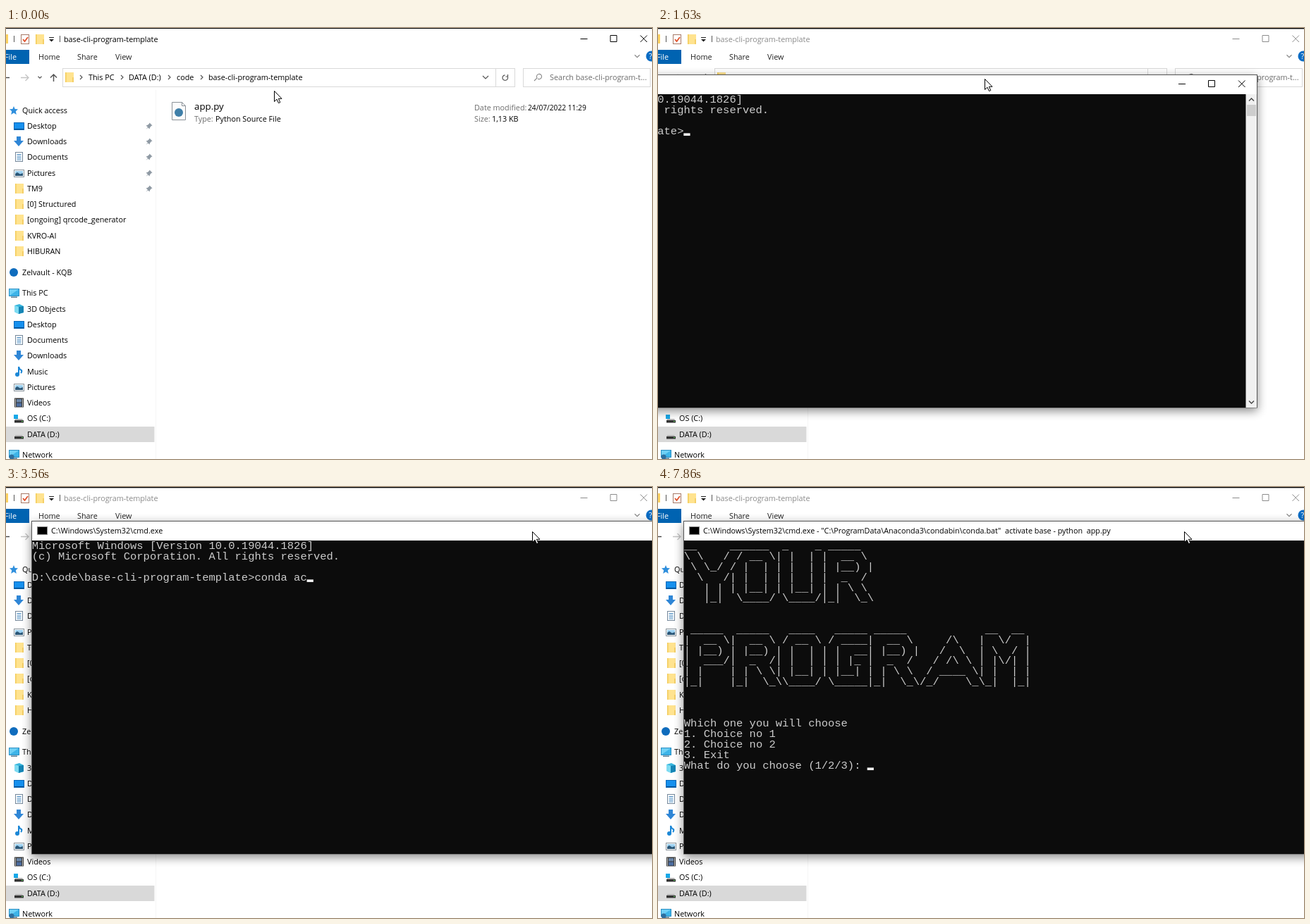
An HTML page that plays this animation: 916 px wide and 612 px high, repeating every 8 s.

```html
<!DOCTYPE html>
<html lang="en">
<head>
<meta charset="utf-8">
<title>Command line program</title>
<style>
html, body { margin: 0; width: 100%; height: 100%; overflow: hidden; background: #fff; }
svg { display: block; }
text { white-space: pre; font: 10.8px "Open Sans", "Noto Sans", sans-serif; }
#rows text { font: 15.47px "Liberation Mono", "DejaVu Sans Mono", monospace; fill: #ccc; }
</style>
</head>
<body>
<svg id="stage" width="916" height="612" viewBox="0 0 916 612"></svg>
<script>
const LOOP = 8000;
const CELL = 9.28, ROW = 14.84, LEFT = 36.8, TOP = 76;
const raw = String.raw;

// Drawing helpers
const text = (x, y, s, fill = '#000', size = 10.8, id = '') =>
  `<text ${id && `id="${id}"`} x="${x}" y="${y}" fill="${fill}" style="font-size:${size}px">${s}</text>`;
const rect = (x, y, w, h, fill, more = '') =>
  `<rect x="${x}" y="${y}" width="${w}" height="${h}" fill="${fill}" ${more}/>`;
const path = (d, fill, stroke = 'none', width = 1) =>
  `<path d="${d}" fill="${fill}" stroke="${stroke}" stroke-width="${width}"/>`;
const line = (d, stroke = '#555', width = 1) => path(d, 'none', stroke, width);
const dot = (x, y, r, fill) => `<circle cx="${x}" cy="${y}" r="${r}" fill="${fill}"/>`;
const at = (x, y, body) => `<g transform="translate(${x} ${y})">${body}</g>`;
const group = (id, body) => `<g id="${id}">${body}</g>`;

const screenIcon = rect(-7, -6, 15, 11, '#2a8fc4') + rect(-6, -5, 13, 9, '#6fd0f5') +
  path('M-6 4L7-5V4z', '#3db4e8') + rect(-4, 5.5, 9, 1.5, '#5b7f95');
const driveIcon = path('M-5 1H5L7 4H-6z', '#b5b5b5') + rect(-6, 3, 13, 3.5, '#333') + rect(4, 4, 2, 1, '#5fd35f');
const icons = {
  folder: rect(-5, -7, 12, 14, '#ffe38f') + rect(-5, -7, 1.5, 14, '#f3cb59') + rect(5, 0, 2, 7, '#f5cf68'),
  star: path('M0-6L1.7-2 6-1.7 2.8 1.2 3.8 6 0 3.4-3.8 6-2.8 1.2-6-1.7-1.7-2z', '#2f8fdd'),
  desktop: rect(-7, -5, 15, 11, '#0567b8') + rect(-6, -4, 13, 8, '#1590ee') + rect(-6, 4, 13, 1, '#0a4f8c'),
  downloads: path('M-3-7H3V-1H7L0 7-7-1H-3z', '#2f86d6'),
  documents: rect(-4.5, -6.5, 10, 13, '#fff', 'stroke="#74879a"') +
    line('M-2.5-3.5H3.5M-2.5-1H3.5M-2.5 1.5H3.5M-2.5 4H3.5', '#3b82bd'),
  pictures: rect(-6.5, -4.5, 14, 10, '#fff', 'stroke="#8a949c"') + rect(-5, -3, 11, 7, '#9cd0f0') +
    path('M-5 4V1L-2-1 2 1.5 6 0V4z', '#2c5878'),
  round: dot(0, 0, 6, '#0f6cbd'),
  screen: screenIcon,
  cube: path('M-6-5L1-7 7-4V5L0 7-6 4z', '#38b6dd') + path('M-6-5L0-3V7L-6 4z', '#7fdcf2') + path('M0-3L7-4V5L0 7z', '#1685b5'),
  music: dot(-2, 4, 3, '#1c87d6') + line('M0 4V-7Q1-3 4-2Q5 0 3 2', '#1c87d6', 2),
  videos: rect(-6, -6.5, 13, 13, '#333') + rect(-3, -5, 7, 4.5, '#6a86a8') + rect(-3, .5, 7, 5, '#4b6ca0') +
    line('M-4.5-5.5V6M5.5-5.5V6', '#ccc'),
  system: rect(-7, -5, 6, 6, '#18a8e8') + driveIcon,
  drive: driveIcon,
  network: at(0, -1, screenIcon) + dot(-3, 3, 3.5, '#2e6f9f')
};
const icon = (name, x, y) => at(x, y, icons[name]);

const sidebar = [
  ['star', 'Quick access', 117, 0], ['desktop', 'Desktop', 139], ['downloads', 'Downloads', 161],
  ['documents', 'Documents', 183], ['pictures', 'Pictures', 206], ['folder', 'TM9', 228],
  ['folder', '[0] Structured', 250], ['folder', '[ongoing] qrcode_generator', 272],
  ['folder', 'KVRO-AI', 295], ['folder', 'HIBURAN', 317],
  ['round', 'Zelvault - KQB', 347, 0], ['screen', 'This PC', 376, 0],
  ['cube', '3D Objects', 399], ['desktop', 'Desktop', 421], ['documents', 'Documents', 443],
  ['downloads', 'Downloads', 465], ['music', 'Music', 488], ['pictures', 'Pictures', 510],
  ['videos', 'Videos', 532], ['system', 'OS (C:)', 554], ['drive', 'DATA (D:)', 577],
  ['network', 'Network', 606, 0]
];
const pin = y => at(203, y, path('M.5-4.5L4.5-.5 3 0 1 2.5 .5 4.5-1.5 2.5-4.5 4.8-2 1.7-4.5-.5-2.5-1 0-3z', '#8f9aa4'));
const chevron = (x, y = 70) => line(`M${x - 1} ${y - 3}l3 3-3 3`, '#555', 1.2);
const down = (x, y, r, color = '#555') => line(`M${x - r} ${y - r / 2}l${r} ${r} ${r}-${r}`, color, 1.2);

function windowButtons(x, y) {
  return line(`M${x - 5} ${y + .5}h10M${x + 37.5} ${y - 4.5}h9v9h-9zM${x + 80} ${y - 4.5}l9.5 9.5m0-9.5l-9.5 9.5`, 'currentColor');
}

function explorer() {
  const head = rect(0, 0, 916, 1, '#000') + rect(0, 1, 916, 1, '#aaa', 'id="edge"') +
    rect(0, 9, 3, 13, '#fbd160') + line('M11.5 11V20M76.5 11V20', '#555') +
    rect(21.5, 9.5, 11, 13, '#fff', 'stroke="#a77a68"') + line('M24 16l2.5 3 4.5-6', '#e0522d', 1.8) +
    icon('folder', 47, 16) + line('M61 13.5h7', '#222') + path('M61 16h7l-3.5 3.5z', '#222') +
    text(82, 20, 'base-cli-program-template', 'currentColor') + windowButtons(819.5, 15);
  const ribbon = rect(0, 31, 33, 20, '#0063b1') + text(-2, 45, 'File', '#fff') +
    [[46, 'Home'], [101, 'Share'], [155, 'View']].map(([x, s]) => text(x, 45, s, '#222')).join('') +
    down(895, 40, 3.5, '#888') + dot(915, 40, 7.5, '#0a6cc4') + text(911.5, 44, '?', '#fff');
  const nav = line('M0 70.5h5', '#444', 1.4) + line('M21 70.5h11m-4.5-4.5l4.5 4.5-4.5 4.5', '#c4c4c4', 1.3) +
    down(48, 70, 2.5) + line('M67.5 76V66m-4.5 4.5l4.5-4.5 4.5 4.5', '#555', 1.5) +
    rect(80.5, 57.5, 641, 26, '#fff', 'stroke="#d9d9d9"') + line('M694.5 58V83', '#d9d9d9') +
    icon('folder', 89, 70) + down(680, 70, 4) +
    line('M711 68.5a3.8 3.8 0 1 1-3.5-1.7M711.5 66v3h-3', '#555', 1.2) +
    rect(733.5, 57.5, 180, 26, '#fff', 'stroke="#d9d9d9"') +
    line('M749 75l4-4a3.6 3.6 0 1 1 1 1', '#888', 1.1) +
    text(771, 74, 'Search base-cli-program-t...', '#6d6d6d');
  const crumbs = [106, 164, 231, 277].map(x => chevron(x)).join('') +
    [[117, 'This PC'], [174, 'DATA (D:)'], [242, 'code'], [287, 'base-cli-program-template']]
      .map(([x, s]) => text(x, 74, s)).join('');
  const edit = rect(103, 64, 177, 15, '#0078d7', 'id="mark"') + text(103, 74, '', '#000', 10.8, 'entry') +
    rect(280, 64, 1, 14, '#000', 'id="caret"');
  const side = line('M212.5 88V612', '#f5f5f5') + rect(0, 566, 210.5, 22, '#d9d9d9') +
    sidebar.map(([name, label, y, top]) =>
      icon(name, top === 0 ? 11 : 18, y) + text(top === 0 ? 23 : 30, y + 4, label)).join('') +
    [139, 161, 183, 206, 228].map(pin).join('');
  const files = path('M235.5 105.5h14l5 5v20h-19z', '#fcfcfc', '#8b9298') + line('M249.5 105.5v5h5', '#8b9298') +
    dot(245, 120, 6, '#3f7fa8') + text(267, 116, 'app.py', '#000', 13.3) +
    text(267, 133, 'Type:', '#6d6d6d') + text(297, 133, 'Python Source File') +
    text(664, 117, 'Date modified:', '#6d6d6d') + text(740, 117, '24/07/2022 11:29', '#000', 10.2) +
    text(664, 133, 'Size:', '#6d6d6d') + text(689, 133, '1,13 KB');
  const list = rect(103.5, 84.5, 609, 48, '#fff', 'stroke="#bbb"') +
    text(108, 102, '', '#000', 10.8, 'hint') + text(108, 125, 'cmd');
  return group('head', head) + ribbon + nav + group('crumbs', crumbs) + group('edit', edit) +
    side + files + group('list', list);
}

function terminal() {
  const rows = Array.from({ length: 22 }, (_, i) =>
    `<text x="${LEFT}" y="${TOP + i * ROW + 12.2}" xml:space="preserve"></text>`).join('');
  return rect(36, 52, 1130, 474, '#000', 'opacity=".45" style="filter:blur(7px)"') +
    rect(36, 48, 1130, 473.5, '#555') + rect(37, 49, 1128, 27, '#fff') + rect(37, 76, 1113, 445, '#0c0c0c') +
    rect(44.5, 56.5, 14, 11, '#000', 'stroke="#888"') + text(64, 66, '', '#000', 10.8, 'title') +
    windowButtons(1059, 61) +
    rect(1149.5, 76, 15.5, 445, '#f0f0f0') + rect(1151, 91, 13, 16, '#cdcdcd') +
    line('M1154 85.5l3.5-3.5 3.5 3.5M1154 511.5l3.5 3.5 3.5-3.5', '#444', 1.4) +
    group('rows', rows) + rect(0, 0, CELL, 3.6, '#f2f2f2', 'id="block"');
}

const arrow = path('M.5 .5V15.5L4 12.2 6.5 17.6 8.8 16.6 6.4 11.3H11z', '#fff', '#000');
const beam = line('M-3 .5h2.5l.5 1 .5-1H3M0 1V15M-3 15.5h2.5l.5-1 .5 1H3', '#000');

const $ = id => document.getElementById(id);
$('stage').innerHTML = explorer() + group('term', terminal()) + group('arrow', arrow) + group('beam', beam);
const rowNodes = [...$('rows').children];

// Timeline
const pointer = [[60, 380, 89], [300, 463, 72], [2030, 463, 72], [2130, 430, 81],
  [2430, 675, 64], [2560, 702, 63], [2790, 746, 63]];
const blinkOff = [[2350, 2930], [4930, 5200], [5460, 5730], [7060, 7200], [7600, 7860]];

const command = 'conda activate base', run = 'python app.py';
const place = raw`D:\code\base-cli-program-template`;
const shell = raw`C:\Windows\System32\cmd.exe`;
const batch = shell + raw` - "C:\ProgramData\Anaconda3\condabin\conda.bat"  activate base`;
const banner = ['Microsoft Windows [Version 10.0.19044.1826]', '(c) Microsoft Corporation. All rights reserved.', ''];
const menu = raw`__     ______  _    _ _____
\ \   / / __ \| |  | |  __ \
 \ \_/ / |  | | |  | | |__) |
  \   /| |  | | |  | |  _  /
   | | | |__| | |__| | | \ \
   |_|  \____/ \____/|_|  \_\


 _____  _____   ____   _____ _____            __  __
|  __ \|  __ \ / __ \ / ____|  __ \     /\   |  \/  |
| |__) | |__) | |  | | |  __| |__) |   /  \  | \  / |
|  ___/|  _  /| |  | | | |_ |  _  /   / /\ \ | |\/| |
| |    | | \ \| |__| | |__| | | \ \  / ____ \| |  | |
|_|    |_|  \_\\____/ \_____|_|  \_\/_/    \_\_|  |_|



Which one you will choose
1. Choice no 1
2. Choice no 2
3. Exit
What do you choose (1/2/3): `.split('\n');

function pointerAt(t) {
  const i = pointer.findIndex(k => k[0] > t);
  if (i === 0) return pointer[0].slice(1);
  if (i < 0) return pointer[pointer.length - 1].slice(1);
  const [t0, x0, y0] = pointer[i - 1], [t1, x1, y1] = pointer[i];
  const k = (t - t0) / (t1 - t0);
  return [x0 + (x1 - x0) * k, y0 + (y1 - y0) * k];
}

const typed = (t, from, gap, first, last) => Math.min(last, first + Math.floor((t - from) / gap));

function commandLength(t) {
  if (t < 2930) return 0;
  if (t < 3100) return 1;
  return t < 3900 ? typed(t, 3100, 75, 2, 10) : typed(t, 3900, 65, 11, 19);
}

function screenLines(t) {
  if (t >= 7200) return menu;
  const lines = [...banner, place + '>' + command.slice(0, commandLength(t))];
  if (t >= 4500) lines.push('');
  if (t >= 4630) lines.push(`(base) ${place}>` + (t < 5930 ? '' : run.slice(0, typed(t, 5930, 58, 1, 13))));
  if (t >= 6860) lines.push('');
  return lines;
}

const show = (id, on) => { $(id).style.display = on ? '' : 'none'; };
const move = (id, x, y) => $(id).setAttribute('transform', `translate(${x} ${y})`);
function setText(node, s) { if (node.textContent !== s) node.textContent = s; }

function drawExplorer(t) {
  const editing = t >= 220 && t < 1400, writing = t >= 800;
  const entry = !writing ? place : t < 830 ? 'c' : t < 1100 ? 'cm' : 'cmd';
  $('head').style.color = t < 1470 ? '#000' : '#8c8c8c';
  show('edge', t >= 1470);
  show('crumbs', !editing);
  show('edit', editing);
  show('list', editing && t >= 830);
  show('mark', !writing);
  show('caret', t < 560 || writing);
  setText($('entry'), entry);
  $('entry').setAttribute('fill', writing ? '#000' : '#fff');
  $('caret').setAttribute('x', writing ? { c: 108, cm: 118, cmd: 125 }[entry] : 280);
  setText($('hint'), `Search for "${t < 1230 ? 'cm' : 'cmd'}"`);
}

function drawTerminal(t) {
  show('term', t >= 1510);
  const open = Math.min(1, Math.max(0, (t - 1510) / 110));
  const [px, py] = t < 2173 ? [430, 81] : pointerAt(t - 43);
  const x = Math.round(px - 746), y = Math.round(py - 63), s = .9 + .1 * open;
  $('term').setAttribute('transform', `translate(${x + 601 * (1 - s)} ${y + 285 * (1 - s)}) scale(${s})`);
  $('term').style.opacity = open;

  const lines = screenLines(t), last = lines.length - 1;
  rowNodes.forEach((node, i) => setText(node, lines[i] || ''));
  setText($('title'), t < 4500 ? shell : t < 6860 ? batch : batch + ' - python  app.py');
  move('block', LEFT + lines[last].length * CELL, TOP + (last + 1) * ROW - 4);
  show('block', !blinkOff.some(([a, b]) => t >= a && t < b));
}

function drawPointer(t) {
  const [x, y] = pointerAt(t).map(Math.round);
  const overText = t >= 300 && t < 800;
  move('arrow', x, y);
  move('beam', x, y - 8);
  show('arrow', t < 300 || t >= 1400);
  show('beam', overText);
}

const start = performance.now();
function frame() {
  const t = (performance.now() - start) % LOOP;
  drawExplorer(t);
  drawTerminal(t);
  drawPointer(t);
  requestAnimationFrame(frame);
}
frame();
</script>
</body>
</html>
```
